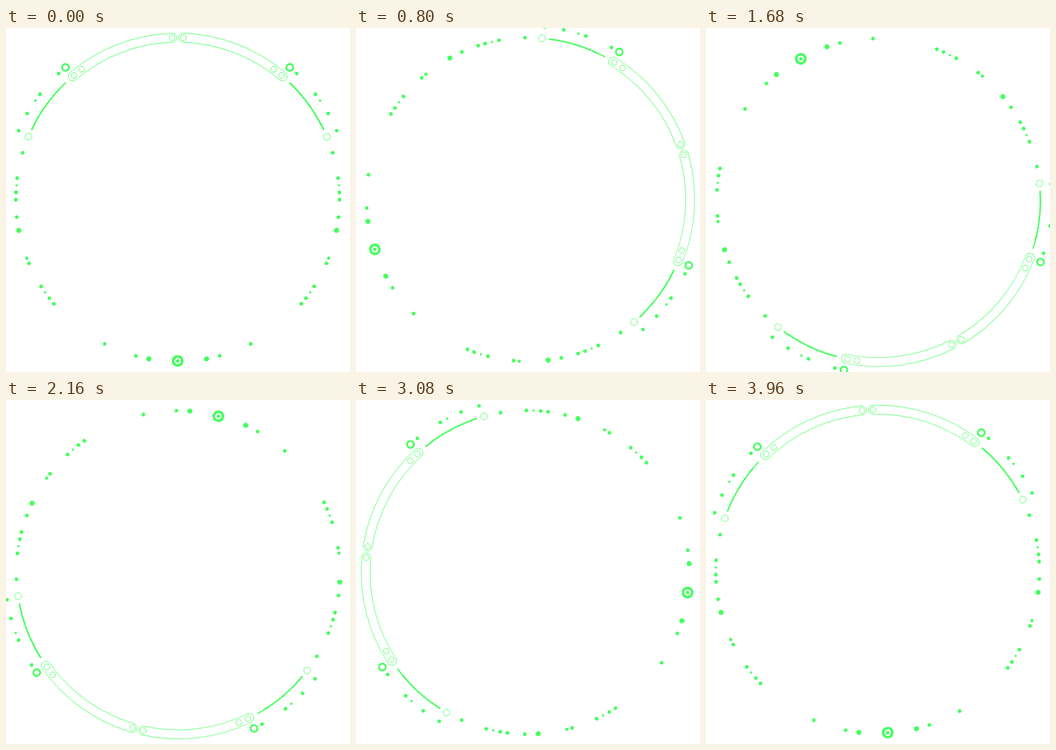
Write an HTML page that moves like this. It is 620 px wide and 620 px high and loops after 4000 ms.

```html
<!DOCTYPE html>
<html lang="en">
<head>
<meta charset="utf-8">
<title>Rotating ring</title>
<style>
  html, body { margin: 0; width: 100%; height: 100%; overflow: hidden; background: #fff; }
  svg { display: block; width: 620px; height: 620px; shape-rendering: crispEdges; }
  #ring { transform-origin: 310px 310px; }
  .dot { fill: #43ff5d; }
  .line { fill: none; stroke: #43ff5d; stroke-width: 0.95; vector-effect: non-scaling-stroke; }
</style>
</head>
<body>
<svg viewBox="0 0 620 620"><g id="ring"></g></svg>
<script>
const LOOP = 4000, STEPS = 100;
const TRACK = 291.7, OUTER = 312.4;
const SMALL = 2.1, MEDIUM = 3.25, LARGE = 4.6;

// Angles are degrees away from the top, towards the left.
const polar = (angle, radius) => {
  const a = angle * Math.PI / 180;
  return [-radius * Math.sin(a), -radius * Math.cos(a)];
};
const point = (angle, radius) => polar(angle, radius).join(' ');

const circle = (angle, r, radius, attrs) => {
  const [x, y] = polar(angle, radius);
  return `<circle cx="${x}" cy="${y}" r="${r}" ${attrs}/>`;
};
const dot = (angle, r = MEDIUM, radius = TRACK) => circle(angle, r, radius, 'class="dot"');
const hollow = (angle, r) => circle(angle, r, TRACK, 'class="line"');
const band = (angle, r, radius, width) =>
  circle(angle, r, radius, `class="line" style="stroke-width:${width}"`);

const arc = (from, to, width) =>
  `<path class="line" style="stroke-width:${width}" d="M${point(from, TRACK)}
    A${TRACK} ${TRACK} 0 0 0 ${point(to, TRACK)}"/>`;

const capsule = (from, to, half) => {
  const far = TRACK + half, near = TRACK - half;
  return `<path class="line" d="M${point(from, far)}
    A${far} ${far} 0 0 0 ${point(to, far)}
    A${half} ${half} 0 0 0 ${point(to, near)}
    A${near} ${near} 0 0 1 ${point(from, near)}
    A${half} ${half} 0 0 0 ${point(from, far)}Z"/>`;
};

// A lead dot, a gap, then evenly spaced beads of which the second is small.
const trail = (start, radius = TRACK, beads = [0, 1, 2, 3]) =>
  dot(start, MEDIUM, radius) + beads.map(i =>
    dot(start + 9.22 + 2.55 * i, i === 1 ? SMALL : MEDIUM, radius)).join('');

const pair = start => dot(start) + dot(start + 4.77, LARGE);

const half = [
  capsule(1.97, 40.45, 8.1),
  hollow(1.97, 5.1), hollow(36.4, 5.1), hollow(39.93, 5.1),
  arc(43.7, 64.6, 2.6),
  hollow(67.2, 6.1),
  band(40.35, 6.2, OUTER, 3.1),
  trail(43.4, OUTER, [0, 1, 3]), dot(66.6, MEDIUM, OUTER),
  trail(73.2), pair(96.25),
  dot(111.28, 2.7), trail(113.25),
  dot(153.18), pair(164.97)
].join('');

const hub = band(180, 8.3, 291, 4.5) + dot(180, 3, 291);

const ring = document.getElementById('ring');
ring.innerHTML = `<g transform="translate(309.4 309.1)">
  <g>${half}</g><g transform="scale(-1 1)">${half}</g>${hub}</g>`;

ring.animate(
  [{ transform: 'rotate(0deg)' }, { transform: 'rotate(360deg)' }],
  { duration: LOOP, iterations: Infinity, easing: `steps(${STEPS})` }
);
</script>
</body>
</html>
```
